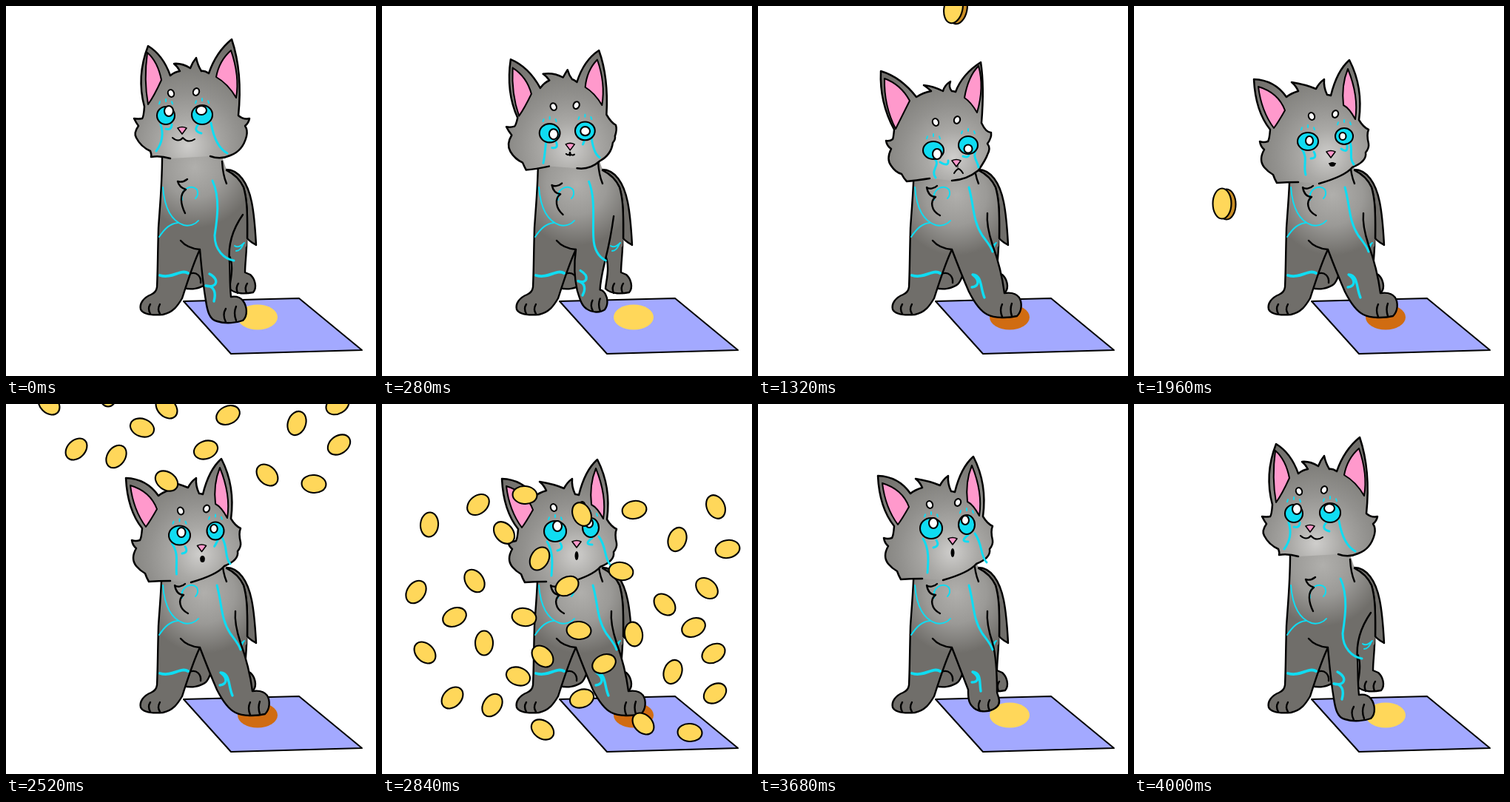
An HTML page with a canvas that plays this animation: 500 px wide and 500 px high, repeating every 4440 ms.

```html
<!DOCTYPE html>
<html lang="en">
<head>
<meta charset="utf-8">
<title>Kitten and coin button</title>
<style>
  html, body { margin: 0; width: 100%; height: 100%; overflow: hidden; background: #fff; }
  canvas { display: block; width: 100%; height: 100%; object-fit: contain; }
</style>
</head>
<body>
<canvas id="stage" width="500" height="500"></canvas>
<script>
const ctx = document.getElementById('stage').getContext('2d');
const LOOP = 4440, INK = '#000', CYAN = '#0fdcf2', GOLD = '#ffd75a', FUR = '#706e6a', PINK = '#ff99cc';

// Head poses: every pose uses the same path structure so that they can be blended.
const sitting = {
  shift: '0 0', glow: '246 188',
  head: 'M276 203Q290 208 303 202Q320 196 325 176Q327 168 323 162Q328 158 329 152Q321 154 314 148Q320 90 305 45Q284 62 274 91Q268 87 264 88Q259 80 257 70Q252 76 249 84Q238 77 227 78Q232 82 235 88Q228 89 222 94Q212 66 192 54Q176 95 187 136Q186 150 184 152Q179 153 173 152Q176 158 179 162Q172 172 176 178Q182 190 195 196Q197 201 196 204Q208 202 222 206',
  ears: 'M191 63Q205 75 210 100Q200 122 192 133Q186 100 191 63M304 60Q316 95 311 124Q300 105 284 96Q288 74 304 60',
  eyes: '216 148 12 12 220 142 6 7 265 147 14 13 264 141 7 6',
  brows: '223 118 257 116', nose: '238 168',
  smile: 'M225 178Q233 185 239 178Q246 186 255 180', gap: '239 178 0 0',
  stripes: 'M209 160C214 176 209 188 203 196M277 158C280 175 286 192 299 199M216 166Q224 168 224 160M264 172Q252 169 260 160'
};
const lookDown = {
  shift: '0 0', glow: '258 195',
  head: 'M256 229Q275 230 289 214Q304 204 304 190Q309 188 310 184Q312 172 308 166Q303 160 297 146Q298 100 286 69Q266 80 257 110Q254 107 253 106Q249 102 247 96Q245 100 242 104Q228 97 212 100Q217 103 221 108Q214 112 209 121Q190 92 163 83Q162 128 181 160Q178 168 176 169Q171 171 165 170Q168 176 173 182Q165 196 172 208Q178 217 187 221Q190 228 194 232Q207 232 228 223',
  ears: 'M168 96Q190 108 197 130Q188 148 181 158Q168 130 168 96M283 80Q294 110 289 140Q280 125 269 118Q270 95 283 80',
  eyes: '233 186 15 13 239 192 6 7 280 182 13 12 281 186 6 6',
  brows: '237 147 266 145', nose: '264 203',
  smile: 'M263 213Q263 213 263 213Q263 213 263 213', gap: '263 213 2.5 5',
  stripes: 'M229 199C224 210 226 215 227 222M287 192C288 200 289 206 291 208M238 207Q248 208 242 198M276 196Q283 198 283 192'
};
const pressing = {
  shift: '0 0', glow: '264 205',
  head: 'M262 236Q282 235 298 222Q308 207 310 201Q315 192 310 186Q316 178 315 171Q308 171 302 158Q306 108 301 76Q276 92 267 116Q264 115 262 115Q257 110 260 102Q252 107 250 115Q236 108 224 107Q230 111 234 115Q223 117 214 123Q193 96 166 88Q164 130 184 167Q183 178 182 180Q178 183 173 182Q174 189 180 193Q173 207 180 216Q186 225 194 227Q197 233 201 237Q212 236 232 233',
  ears: 'M171 98Q193 106 205 128Q195 148 186 166Q170 135 171 98M298 81Q306 110 296 144Q288 130 279 124Q284 95 298 81',
  eyes: '237 195 14 12 242 200 6 7 284 188 13 12 284 193 5.5 5.5',
  brows: '240 157 269 154', nose: '268 212',
  smile: 'M265 226Q268 221 271 220Q274 221 277 226', gap: '270 217 .5 3',
  stripes: 'M238 206C248 214 232 222 240 232M294 196C290 205 297 210 298 218M246 211Q258 218 257 209M277 203Q286 206 285 199'
};
const lookUp = {
  shift: '0 0', glow: '262 200',
  head: 'M250 238Q285 228 295 216Q315 208 313 196Q318 190 317 184Q314 172 317 165Q310 162 304 152Q310 108 291 71Q274 86 266 119Q263 118 261 118Q256 108 257 97Q250 102 246 110Q232 104 213 101Q219 106 222 113Q212 116 206 121Q190 98 162 97Q164 140 184 165Q183 178 181 181Q175 183 170 181Q171 188 176 192Q168 206 176 216Q181 222 188 226Q190 232 193 237Q206 236 222 236',
  ears: 'M168 107Q195 115 204 139Q195 155 189 163Q172 140 168 107M289 83Q304 120 299 151Q291 136 283 132Q280 105 289 83',
  eyes: '234 168 15 14 237 161 6 7 282 163 11 13 280 157 5 6',
  brows: '232 136 270 133', nose: '263 185',
  smile: 'M263 201Q263 201 263 201Q263 201 263 201', gap: '263 201 2.5 6',
  stripes: 'M223 182C232 196 230 215 229 228M293 175C304 190 300 205 309 214M237 194Q246 192 241 184M284 186Q272 186 284 177'
};
const amazed = { ...lookUp, shift: '0 4' };
const puzzled = { ...lookUp,
  shift: '0 2',
  eyes: '235 181 14 12 237 180 5 6 284 174 12 11 282 174 4.5 5',
  brows: '240 147 272 144', nose: '266 198',
  smile: 'M264 211Q264 211 264 211Q268 211 272 211', gap: '268 212 4 3',
  stripes: 'M226 190C236 203 228 213 232 226M292 182C296 193 290 203 297 212M239 204Q248 204 243 195M280 191Q289 198 288 186'
};

// Front leg poses, with the markings that follow the leg.
const legDown = {
  glow: '255 218',
  leg: 'M262 329C264 352 266 375 270 398C272 412 275 424 285 426C297 430 312 428 320 425C327 419 326 406 320 398C316 393 310 392 304 393C302 375 303 357 302 345C300 325 304 305 320 282M297 409Q292 417 297 427M311 406Q307 415 311 425',
  flank: 'M279 236C290 260 285 290 282 310C282 330 295 342 308 344',
  mark: 'M275 362C290 370 284 382 270 378C282 378 284 388 281 399',
  tuft: 'M245 234C240 238 235 238 232 237C234 245 240 247 243 248C234 254 236 268 242 280'
};
const tuft = 'M242 243C238 247 231 248 228 245C230 256 236 258 240 258C232 264 234 277 246 283';
const legLift = {
  glow: '268 255', tuft,
  leg: 'M262 329C257 342 256 362 260 376C265 388 267 394 271 399C276 405 284 407 289 402C293 396 293 389 291 384C290 381 289 379 289 378C291 366 297 352 302 340C310 325 314 305 309 285M277 391Q274 397 278 404M285 389Q282 396 285 404',
  flank: 'M280 238C288 260 284 290 288 315C289 330 293 338 299 344',
  mark: 'M264 355C275 362 274 372 262 368C271 372 270 380 265 386'
};
const legPress = {
  glow: '268 255', tuft,
  leg: 'M262 329C270 350 278 370 285 386C292 400 300 412 310 417C320 422 338 422 350 419C357 412 357 401 353 394C348 387 340 387 333 388C330 365 324 342 317 323C311 305 309 290 310 280M330 403Q326 411 330 420M343 402Q340 410 343 419',
  flank: 'M285 245C292 270 290 290 303 310C312 322 315 325 317 332',
  mark: 'M289 380C300 378 299 370 290 363C303 364 300 380 306 394'
};
const legRise = { ...legPress,
  leg: 'M262 329C270 350 278 370 284 386C284 394 284 403 289 408C296 417 310 417 319 412C327 408 327 402 325 396C324 393 323 391 323 389C323 368 322 342 317 323C311 305 309 290 310 280M300 401Q296 408 300 415M313 400Q309 407 313 414',
  mark: 'M289 376C299 376 299 368 290 362C302 363 299 376 301 388'
};

const headTrack = [[-17, sitting], [440, lookDown], [720, lookDown], [960, pressing], [1480, pressing],
  [1640, puzzled], [2360, puzzled], [2680, amazed], [3679, amazed], [3680, lookUp], [4000, sitting]];
const legTrack = [[-17, legDown], [440, legLift], [720, legLift], [960, legPress],
  [3679, legPress], [3680, legRise], [4000, legDown]];
const coinTrack = [[1320, { at: '264 3 .2' }], [1480, { at: '258 96 .5' }], [1560, { at: '232 70 .9' }],
  [1640, { at: '202 65 .6' }], [1720, { at: '173 85 .3' }], [1800, { at: '149 128 .1' }],
  [1960, { at: '119 267 0' }], [2040, { at: '114 347 0' }], [2200, { at: '111 500 0' }]];

// Falling coins: x, y, tilt in degrees.
const rain = [64,163,95, 130,136,-40, 165,174,50, 193,123,5, 213,209,-60, 270,149,65, 341,143,-10,
  399,183,-70, 451,139,65, 467,196,-10, 439,249,40, 323,226,10, 250,246,-30, 382,271,45, 421,302,-25,
  340,311,80, 266,306,5, 192,288,10, 125,239,55, 46,254,-55, 98,288,-25, 58,336,45, 138,323,90,
  217,341,45, 300,351,-25, 393,362,-70, 448,337,-30, 450,391,-35, 416,444,5, 353,432,45,
  270,398,-20, 184,368,20, 149,407,-55, 95,397,-45, 217,440,35];

const NUMBER = /-?\d*\.?\d+/g;
const nums = s => s.match(NUMBER).map(Number);

function blend(a, b, k) {
  const to = nums(b);
  let i = 0;
  return a.replace(NUMBER, v => (+v + (to[i++] - v) * k).toFixed(2));
}

function poseAt(track, t) {
  const i = track.findIndex(key => key[0] > t);
  if (i < 0) return track[track.length - 1][1];
  if (i === 0) return track[0][1];
  const [t0, a] = track[i - 1], [t1, b] = track[i];
  const k = (t - t0) / (t1 - t0), pose = {};
  for (const part in a) pose[part] = blend(a[part], b[part], k);
  return pose;
}

// The drawing is animated in held steps.
function heldTime(t) {
  const base = [3680, 1320, 720, 40].find(b => b <= t);
  if (base === undefined) return -17;
  const step = base === 40 ? 400 / 7 : 80;
  return base + Math.floor((t - base) / step + 1e-6) * step;
}

function paint(shape, fill, stroke, width = 2.4) {
  const path = typeof shape === 'string' ? new Path2D(shape) : shape;
  if (fill) { ctx.fillStyle = fill; ctx.fill(path); }
  if (stroke) { ctx.strokeStyle = stroke; ctx.lineWidth = width; ctx.stroke(path); }
}
const line = (d, color = INK, width) => paint(d, null, color, width);

function oval(x, y, rx, ry, fill, stroke, tilt = 0) {
  const path = new Path2D();
  path.ellipse(x, y, rx, ry, tilt, 0, 2 * Math.PI);
  paint(path, fill, stroke, 2.1);
}

function furGlow(at, radius, ...colors) {
  const [x, y] = nums(at);
  const g = ctx.createRadialGradient(x, y, 0, x, y, radius);
  colors.forEach((c, i) => g.addColorStop(i / (colors.length - 1), c));
  return g;
}

function drawMat(pressed) {
  paint('M240 399L396 395L481 465L304 470Z', '#a3a9ff', INK, 2);
  oval(340, 420.5, 27, 17, pressed ? '#d06c12' : GOLD);
}

function drawBody(p) {
  const fur = furGlow(p.glow, 82, '#b0afac', '#9b9a97', FUR);
  const leftSide = 'M211 204C211 240 208 270 206 300C205 335 205 360 204 380Q203 387 196 390C186 394 180 402 182 410C186 418 200 418 212 417C226 414 232 405 238 395C243 380 252 350 262 329';

  paint('M296 221C315 220 327 240 332 265C336 285 337 305 338 323C333 320 329 318 326 314C326 290 327 265 321 245C315 232 306 226 298 222', FUR, INK);
  paint('M301 335C309 352 303 370 302 382C310 390 325 389 334 387C340 380 336 368 330 363L323 360C323 345 326 330 325 312', FUR, INK);
  line('M313 388Q310 380 314 375M325 388Q322 380 326 375');
  paint('M262 329L246 360L240 381C250 384 262 382 270 376C276 371 278 365 278 355Z', FUR);
  line('M248 362C258 358 264 366 263 374M240 381C250 384 262 382 270 376C274 372 276 365 278 360');

  paint(leftSide + 'L300 340L325 325L326 314C326 290 327 265 321 245C315 232 306 226 298 222L291 200Z', fur);
  line(leftSide + 'C250 328 242 324 236 317');
  line('M326 314C326 290 327 265 321 245C315 232 306 226 298 222');
  line('M195 403Q191 409 195 416M208 403Q204 410 208 416M292 210Q293 228 298 240');
  line('M309 324Q314 328 322 320M311 331Q317 331 321 321', CYAN, 2);
  paint(p.leg, fur, INK);

  line('M212 245C214 270 222 290 240 296C248 298 256 295 260 290M207 312C215 300 222 294 232 293M238 262C235 248 250 240 258 248Q261 255 256 260', CYAN, 2);
  line('M208 364C225 369 236 355 246 361', CYAN, 3.8);
  line(p.flank, CYAN, 3);
  line(p.mark, CYAN, 3.4);
  line(p.tuft);
}

function drawHead(p) {
  ctx.save();
  ctx.translate(...nums(p.shift));
  paint(p.head, furGlow(p.glow, 140, '#cfcecc', '#aaa9a6', '#92918e', '#7f7e7a', FUR), INK, 2.5);
  paint(p.ears, PINK, INK, 2);
  line(p.stripes, CYAN, 3);

  const eyes = nums(p.eyes), brows = nums(p.brows);
  for (const side of [0, 1]) {
    const [x, y, rx, ry, px, py, prx, pry] = eyes.slice(side * 8);
    oval(x, y, rx, ry, CYAN, INK);
    oval(px, py, prx, pry, '#fff', INK);
    for (const d of [-8, 0, 8])
      line(`M${x + d} ${y - 22 + d * d / 20}l${d / 8} 3`, CYAN, 2);
    oval(brows[side * 2], brows[side * 2 + 1], 4, 5, '#fff', INK, side ? .4 : -.4);
  }

  const [nx, ny] = nums(p.nose);
  paint(`M${nx - 6} ${ny - 3}Q${nx} ${ny - 6} ${nx + 6} ${ny - 3}L${nx} ${ny + 5}Z`, PINK, INK, 1.6);
  line(p.smile, INK, 2);
  oval(...nums(p.gap), INK);
  ctx.restore();
}

function drawCoins(t) {
  if (t >= 1320 && t < 2280) {
    const [x, y, tilt] = nums(poseAt(coinTrack, t).at);
    oval(x + 6, y + 1, 12.5, 20.5, '#c98d25', INK, tilt);
    oval(x, y, 12.5, 20.5, GOLD, INK, tilt);
  }
  if (t >= 2440 && t < 3240) {
    const fall = (t - 2840) * 1.05;
    for (let i = 0; i < rain.length; i += 3)
      oval(rain[i], rain[i + 1] + fall, 16.5, 12, GOLD, INK, rain[i + 2] * Math.PI / 180);
  }
}

function frame(now) {
  const t = heldTime(now % LOOP);
  ctx.fillStyle = '#fff';
  ctx.fillRect(0, 0, 500, 500);
  ctx.lineCap = ctx.lineJoin = 'round';
  drawMat(t >= 960 && t < 3680);
  drawBody(poseAt(legTrack, t));
  drawHead(poseAt(headTrack, t));
  drawCoins(t);
  requestAnimationFrame(frame);
}
requestAnimationFrame(frame);
</script>
</body>
</html>
```
